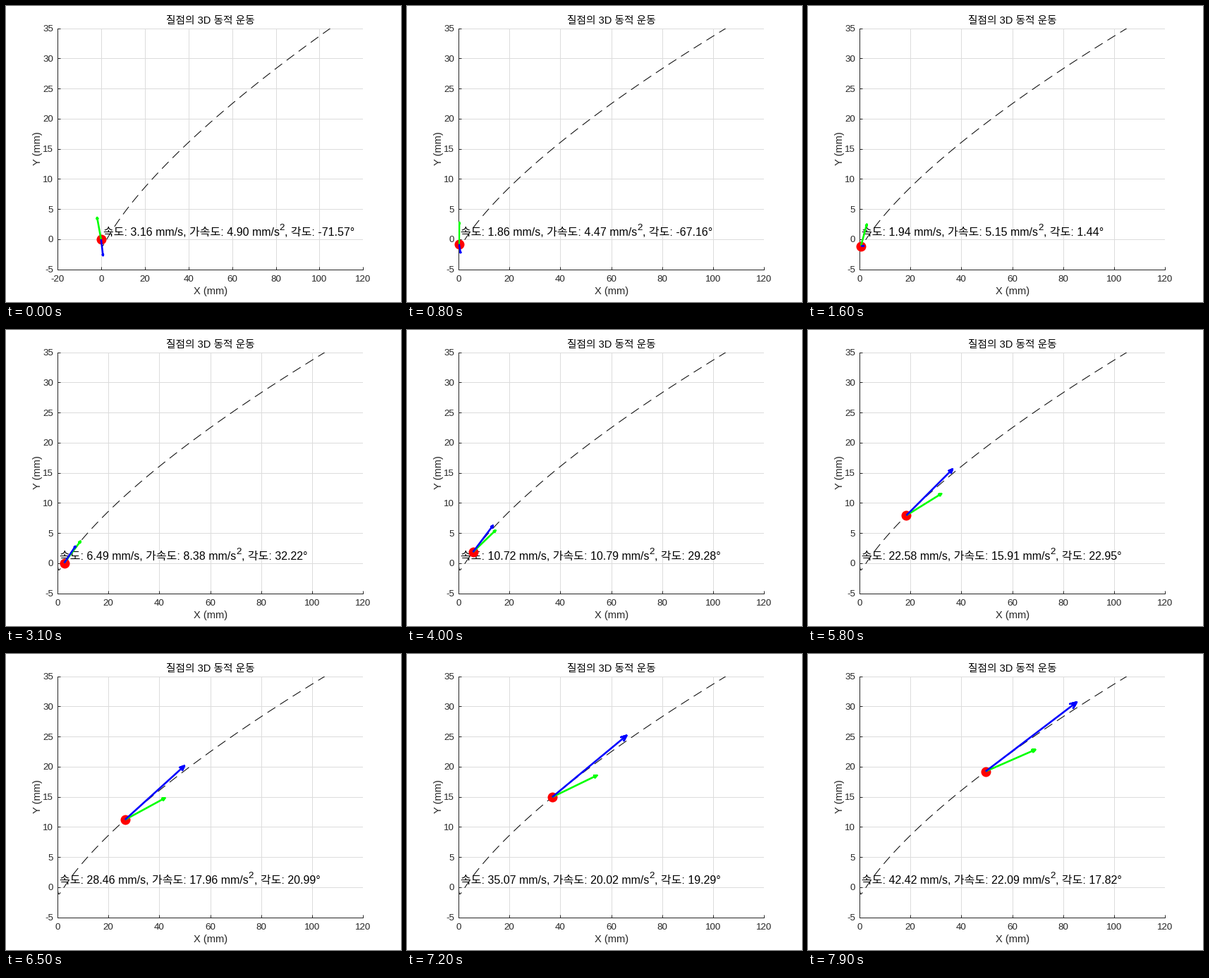
Recreate the animation shown at these times as a matplotlib script. Size 560 by 420 pixels, loop 8000 ms.

```python
import numpy as np
import matplotlib.pyplot as plt
from matplotlib.animation import FuncAnimation

W, H, DPI = 560, 420, 80
PX = 72 / DPI                      # points per pixel
LEFT, RIGHT, TOP, BOTTOM = 72.8, 506.4, 31.6, 373.7
DARK = "#262626"

plt.rcParams.update({
    "font.family": ["Liberation Sans", "Noto Sans CJK JP"],
    "font.weight": "light",
    "axes.unicode_minus": False,
    "toolbar": "None",
})


def position(t):
    return np.array([t**3 - t**2 + t, 2 * t**2 - 3 * t, t**2])


def velocity(t):
    return np.array([3 * t**2 - 2 * t + 1, 4 * t - 3, 2 * t])


def acceleration(t):
    return np.array([6 * t - 2, 4, 2])


times = np.linspace(0, 5, 100)

fig = plt.figure(figsize=(W / DPI, H / DPI), dpi=DPI, facecolor="white")
ax = fig.add_axes([LEFT / W, 1 - BOTTOM / H, (RIGHT - LEFT) / W, (BOTTOM - TOP) / H])
ax.set_ylim(-5, 35)
ax.set_xlim(-20, 120)
ax.set_yticks(range(-5, 36, 5))
ax.set_axisbelow(True)
ax.grid(True, color="#dcdcdc", lw=PX)
ax.tick_params(direction="in", length=4.4 * PX, width=PX, color=DARK,
               labelcolor=DARK, labelsize=13.33 * PX)
ax.tick_params(axis="x", pad=8.1 * PX)
ax.tick_params(axis="y", pad=5.5 * PX)
for side in ("top", "right"):
    ax.spines[side].set_visible(False)
for side in ("left", "bottom"):
    ax.spines[side].set(color=DARK, linewidth=PX)


def label(x, y, text="", size=14.67, color="black", **kw):
    """Text at a pixel position measured from the top left, on its baseline."""
    kw = {"va": "baseline", "zorder": 3, **kw}
    return ax.text(x, H - y, text, fontsize=size * PX, color=color,
                   transform=None, **kw)


label(290, 25, "질점의 3D 동적 운동", ha="center")
label(290, 409.5, "X (mm)", color=DARK, ha="center")
label(48.5, 202, "Y (mm)", color=DARK, ha="center", rotation=90,
      rotation_mode="anchor")

path = position(times)
ax.plot(path[0], path[1], color="black", lw=PX, dashes=(13.3, 8),
        dash_capstyle="butt", zorder=2)

head = label(0, 326, size=16)
power = label(0, 318, "2", size=13.33)
tail = label(0, 326, size=16)
dot, = ax.plot([], [], "o", color="red", ms=14 * PX, mew=0, clip_on=False, zorder=4)


def make_arrow(color, z):
    return ax.plot([], [], color=color, lw=2.6 * PX, zorder=z,
                   solid_capstyle="butt", solid_joinstyle="round")[0]


acc_arrow = make_arrow("#00ff00", 5)
vel_arrow = make_arrow("#0000ff", 6)


def set_arrow(line, start, vec, scale):
    """Shaft of 0.9 times the vector, with an open head sized by its length."""
    a = start * scale
    d = 0.9 * vec * scale
    tip = a + d
    pts = [a, tip]
    for turn in np.radians([23, -23]):
        c, s = np.cos(turn), np.sin(turn)
        barb = tip - 0.06 * np.array([c * d[0] - s * d[1], s * d[0] + c * d[1]])
        pts += [barb, tip]
    pts = np.array(pts) / scale
    line.set_data(pts[:, 0], pts[:, 1])


def update(i):
    t = times[max(i - 1, 0)]
    p, v, a = position(t), velocity(t), acceleration(t)

    x0 = -20 if p[0] + 0.9 * a[0] < 0 else 0
    ax.set_xlim(x0, 120)
    scale = np.array([(RIGHT - LEFT) / (120 - x0), (BOTTOM - TOP) / 40])

    dot.set_data([p[0]], [p[1]])
    set_arrow(vel_arrow, p[:2], v[:2], scale)
    set_arrow(acc_arrow, p[:2], a[:2], scale)

    speed, pull = np.linalg.norm(v), np.linalg.norm(a)
    angle = np.degrees(np.arctan2(v[1], v[0]))
    head.set_text(f"속도: {speed:.2f} mm/s, 가속도: {pull:.2f} mm/s")
    tail.set_text(f", 각도: {angle:.2f}°")
    head.set_x(LEFT + (1 - x0) * scale[0])
    end = head.get_window_extent(fig.canvas.get_renderer()).x1
    power.set_x(end - 0.3)
    tail.set_x(end + 7.5)
    return dot, vel_arrow, acc_arrow, head, power, tail


anim = FuncAnimation(fig, update, frames=80, interval=100, repeat=True,
                     repeat_delay=0, blit=False)
plt.show()
```
